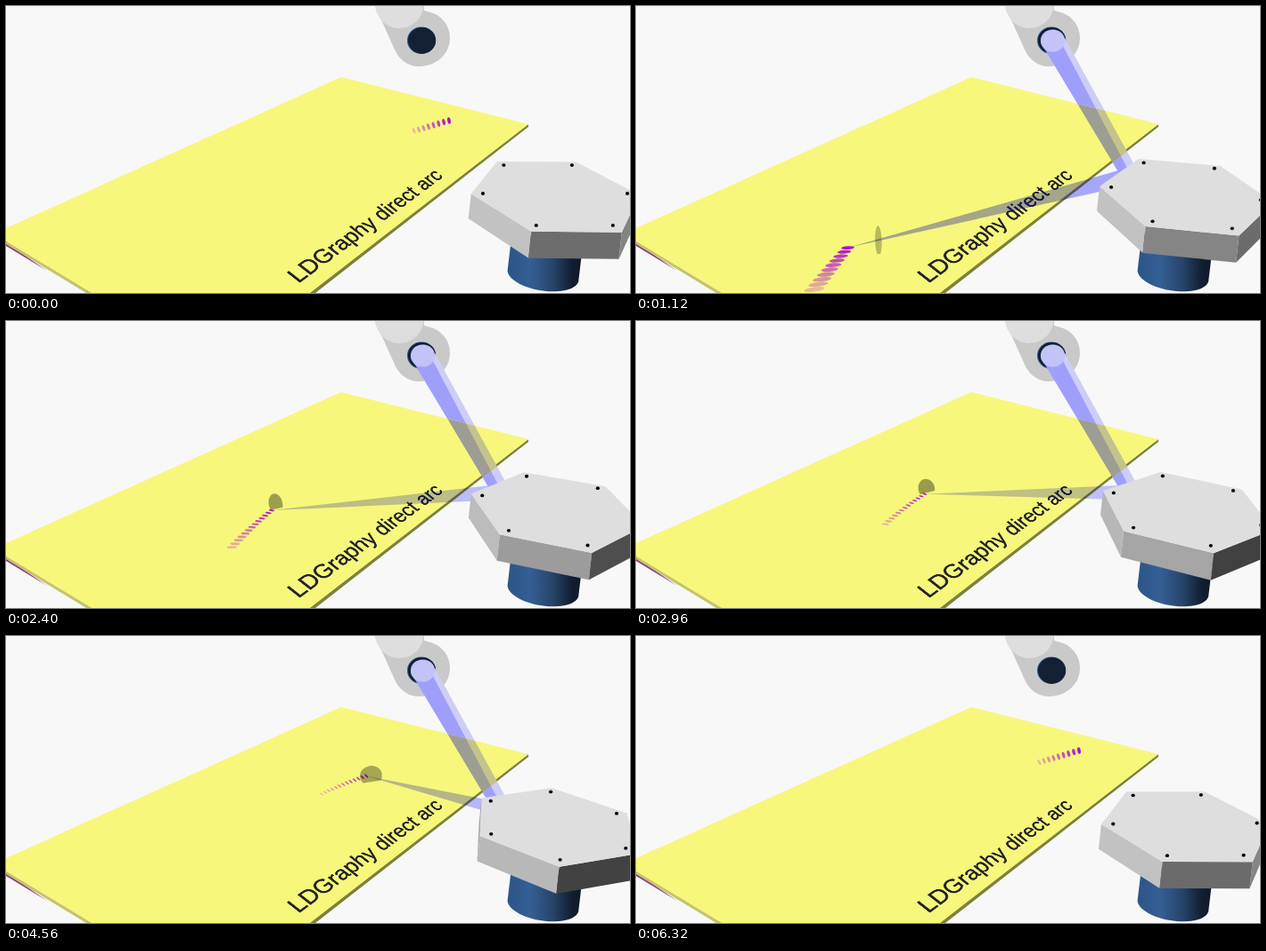
Animation of 700 by 323 pixels, one loop 6.4 s. Source, as an HTML page:

```html
<!DOCTYPE html>
<html lang="en">
<head>
<meta charset="utf-8">
<title>LDGraphy direct arc</title>
<style>
  html, body { margin: 0; width: 100%; height: 100%; overflow: hidden; background: #f8f8f8; }
  #stage { position: absolute; inset: 0; overflow: hidden; contain: strict; }
  svg { position: absolute; left: 0; top: 0; }
  #label {
    overflow: visible;
    transform-origin: 0 0;
    transform: matrix3d(1.0032, -.3429, 0, .000718, .76, .598, 0, 0, 0, 0, 1, 0, 328, 312.5, 0, 1);
  }
  #label text {
    font: 28px "Liberation Sans", Arial, sans-serif;
    fill: #242424; stroke: #242424; stroke-width: .5;
  }
</style>
</head>
<body>
<div id="stage">
<svg width="700" height="323" viewBox="0 0 700 323">
  <!-- board -->
  <path fill="#8c3c88" d="M0 266L0 270L46 298Z"/>
  <path fill="#c6c46c" d="M-14 256L97 323H90L0 268L-14 260Z"/>
  <path fill="#7f7f3e" d="M586 133V136L347 323H340Z"/>
  <path fill="#f7f77c" d="M376 80L586 133L332 330H108L-13.700 256.200Z"/>
  <!-- laser housing -->
  <path fill="#c9c9c9" d="M414 0L436 49C441 61 452 68 463 68C484 68 498 53 498 36C498 22 489 12 479 8L469 5V0Z"/>
  <path fill="#dedede" d="M414 0C416 15 428 25 441 25C456 25 467 14 468.500 0Z"/>
  <ellipse cx="466" cy="38.700" rx="16" ry="15.200" fill="#2f5c92"/>
  <ellipse cx="466.600" cy="38.800" rx="15.600" ry="14.900" fill="#132034"/>
</svg>

<svg id="label" width="260" height="40"><text x="0" y="0">LDGraphy direct arc</text></svg>

<svg width="700" height="323" viewBox="0 0 700 323">
  <defs>
    <linearGradient id="steel">
      <stop offset="0" stop-color="#2c5587"/>
      <stop offset=".3" stop-color="#345f95"/>
      <stop offset=".6" stop-color="#264469"/>
      <stop offset=".85" stop-color="#121e32"/>
      <stop offset="1" stop-color="#0e1828"/>
    </linearGradient>
    <clipPath id="onBoard"><path d="M376 80L586 133V136L347 323H90L-14 257Z"/></clipPath>
    <clipPath id="offBoard">
      <path clip-rule="evenodd" d="M0 0H700V323H0ZM376 80L586 133V136L347 323H90L-14 257Z"/>
    </clipPath>
    <g id="beam">
      <path fill="currentColor" d="M470 40L481 36L562 184L543 190Z"/>
      <path d="M454.500 42L479 45L553 186L543 190Z"/>
    </g>
    <path id="ray"/>
  </defs>
  <g id="trail" fill="#b010d0" clip-path="url(#onBoard)"></g>
  <g id="light">
    <use href="#ray" fill="#00f" clip-path="url(#offBoard)"/>
    <use href="#ray" fill="#0000a0" clip-path="url(#onBoard)"/>
    <use href="#beam" fill="#9f9ffb" color="#cdcdf8" clip-path="url(#offBoard)"/>
    <use href="#beam" fill="#9d9d94" color="#c3c38c" clip-path="url(#onBoard)"/>
    <ellipse cx="467.500" cy="39" rx="13.600" ry="12.600" fill="#c3c3f8"/>
    <path id="lens"/>
  </g>
  <path id="motor" fill="url(#steel)"/>
  <g id="sides"></g>
  <path id="top" fill="#dedede"/>
  <g id="screws"></g>
</svg>
</div>

<script>
const STEP = 80, STEPS = 80, ON = 5, OFF = 75, TRAIL = 13;
const SPOT = { x: 548, y: 193 };   // where the laser meets the mirror

const $ = id => document.getElementById(id);
const cos = deg => Math.cos(deg * Math.PI / 180);
const sin = deg => Math.sin(deg * Math.PI / 180);
const path = pts => "M" + pts.map(p => p[0].toFixed(2) + " " + p[1].toFixed(2)).join("L") + "Z";

function add(parent, tag, count) {
  return Array.from({ length: count }, () =>
    $(parent).appendChild(document.createElementNS("http://www.w3.org/2000/svg", tag)));
}

function set(el, attrs) {
  for (const name in attrs) el.setAttribute(name, attrs[name]);
}

// a + b u + c u^2 + d u^3
const poly = (u, a, b = 0, c = 0, d = 0) => a + u * (b + u * (c + u * d));

// Scan position: -1 when the laser turns on, 1 when it turns off
const scan = step => (2 * step - ON - OFF) / (OFF - ON);

const tip = u => ({ x: poly(u, 335, 132, 13.5, 16.5), y: poly(u, 188, -76, 36, -19) });

// Point on the tilted mirror plane, seen in perspective
function onDisc(deg, r, cy) {
  const c = r * cos(deg), s = r * sin(deg), w = 1 + .068 * s;
  return [(616 + 81 * c + 18.2 * s) / w, (cy - 24.7 * s) / w, w];
}

const marks = add("trail", "ellipse", TRAIL);
const sides = add("sides", "path", 6);
const screws = add("screws", "ellipse", 6);

function drawMotor() {
  const rim = [];
  for (let a = 164; a <= 344; a += 5) {
    rim.push([602.5 + 38.3 * cos(a) - 11.2 * sin(a), 302.8 - 18.5 * sin(a)]);
  }
  const lift = ([x, y]) => [x + 5, y - 42];
  $("motor").setAttribute("d", path([...rim, lift(rim[rim.length - 1]), lift(rim[0])]));
}

function drawMirror(step) {
  const turn = step * 60 / STEPS, corners = [];
  for (let i = 0; i < 6; i++) {
    corners.push(onDisc(60 * i - turn - 1, 1.16, 212));
    const [x, y] = onDisc(60 * i - turn, 1, 211);
    set(screws[i], { cx: x, cy: y, rx: 2.1, ry: 1.9 });
  }
  const low = ([x, y, w]) => [x - 3 / w, y + 28 / w];
  corners.forEach((p, i) => {
    const q = corners[(i + 1) % 6];
    const front = (q[0] - p[0]) * 28 + (q[1] - p[1]) * 3 > 0;
    const grey = Math.round(46 + 149 * Math.abs(cos(60 * i + 30 - turn - 205)));
    set(sides[i], {
      d: front ? path([p, q, low(q), low(p)]) : "",
      fill: `rgb(${grey},${grey},${grey})`
    });
  });
  $("top").setAttribute("d", path(corners));
}

function drawTrail(step) {
  const now = step < ON ? step + STEPS : step;
  const first = Math.max(ON, now - TRAIL + 1), last = Math.min(OFF, now);
  marks.forEach((el, i) => {
    const at = first + i;
    if (at > last) return set(el, { visibility: "hidden" });
    const u = scan(at), { x, y } = tip(u);
    set(el, {
      visibility: "visible",
      rx: poly(u, 2.5, -1, 5.2, -3),
      ry: poly(u, .75, -.4, 1.5),
      transform: `translate(${x} ${y}) rotate(${poly(u, 22, 44, 14)})`,
      opacity: .25 + .75 * (at - first) / Math.max(1, last - first)
    });
  });
}

function drawLens(u, { x, y }) {
  const near = Math.max(0, -u) ** 3;
  const rx = poly(u, 9.8, 6.5, -2.3), ry = poly(u, 10.8, -1.2, 4) + 7 * near;
  const cut = Math.min(.98, .4 + .9 * u * u);   // the board hides the part below
  const cx = rx * Math.sqrt(1 - cut * cut), cy = ry * cut;
  const lx = x + poly(u, 2, 0, 14) + 60 * near, ly = y + poly(u, -5.5, 8, 6);
  set($("lens"), {
    d: `M${-cx} ${cy}A${rx} ${ry} 0 1 1 ${cx} ${cy}Z`,
    transform: `translate(${lx} ${ly}) rotate(${poly(u, -14, 0, 22)})`,
    "fill-opacity": .38 - .23 * u * u
  });
}

function drawLight(step) {
  const lit = step >= ON && step <= OFF;
  $("light").style.display = lit ? "" : "none";
  if (!lit) return;
  const u = scan(step), end = tip(u);
  const dx = SPOT.x - end.x, dy = SPOT.y - end.y, k = (8 - 2 * u) / Math.hypot(dx, dy);
  set($("ray"), {
    d: path([[end.x, end.y], [SPOT.x + dy * k, SPOT.y - dx * k], [SPOT.x - dy * k, SPOT.y + dx * k]]),
    opacity: .22 + .2 * u * u
  });
  drawLens(u, end);
}

function draw(ms) {
  const step = Math.floor(ms / STEP) % STEPS;
  drawTrail(step);
  drawLight(step);
  drawMirror(step);
}

const start = performance.now();
function tick() {
  draw(performance.now() - start);
  requestAnimationFrame(tick);
}
drawMotor();
tick();
</script>
</body>
</html>
```
